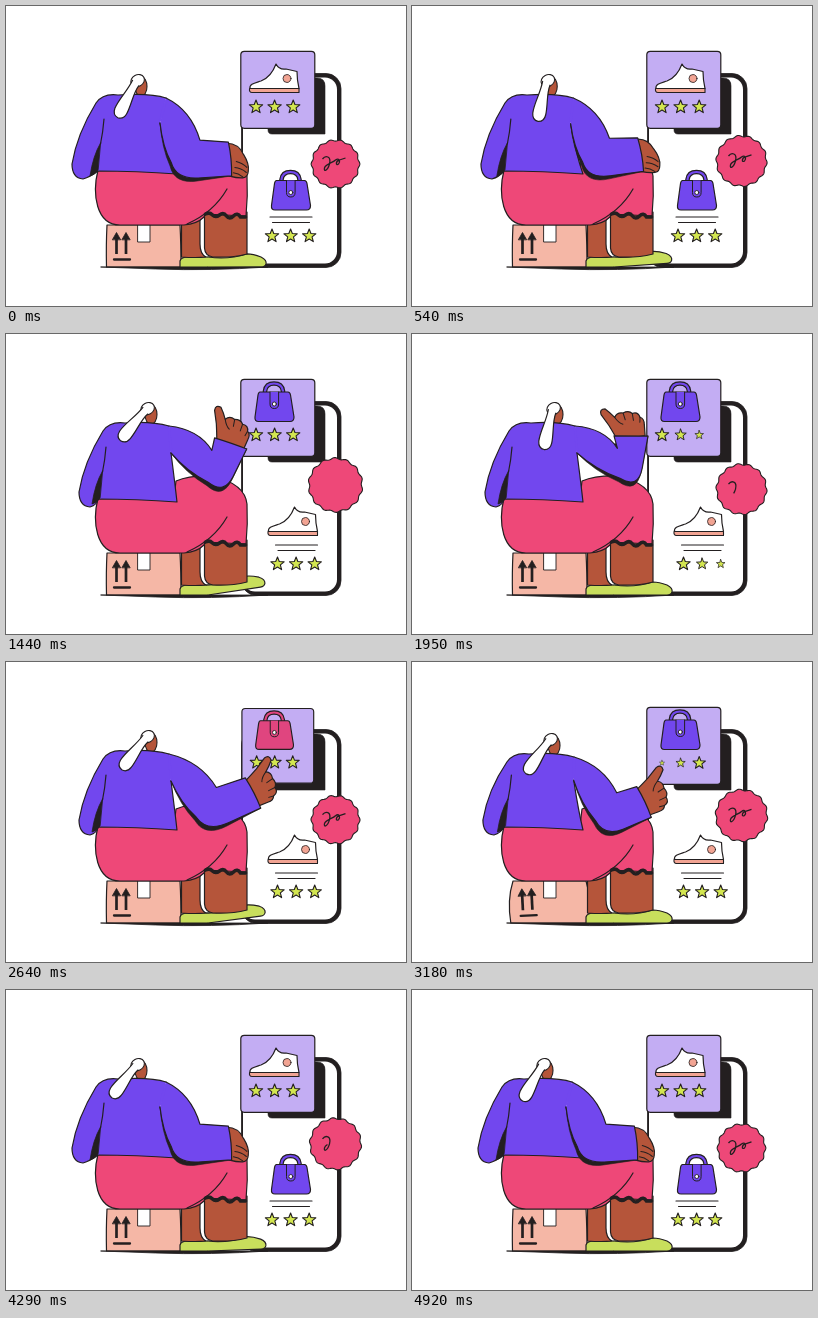
An HTML page for the animation above (4.95 s loop, 400 px wide and 300 px high).

```html
<!DOCTYPE html>
<html lang="en">
<head>
<meta charset="utf-8">
<title>Shopping</title>
<style>
html, body { margin: 0; width: 100%; height: 100%; overflow: hidden; background: #fff; }
svg { display: block; width: 100vw; height: 100vh; }
</style>
</head>
<body>
<svg id="stage" viewBox="0 0 400 300" stroke-linecap="round" stroke-linejoin="round"></svg>
<script>
const LOOP = 4950, TAU = 2 * Math.PI;
const INK = '#231f20', PURPLE = '#7247ee', LAVENDER = '#c3adf3', PINK = '#ee4878', MAGENTA = '#e0457f',
  SKIN = '#b5553a', LIME = '#c8de5c', STAR = '#d3e650', CARTON = '#f5b7a6', SOLE = '#f2a493';
const stage = document.getElementById('stage');

// Motion helpers
const lerp = (a, b, u) => a + (b - a) * u;
const smooth = (t, from, to) => {
  const u = Math.min(1, Math.max(0, (t - from) / (to - from)));
  return u * u * (3 - 2 * u);
};
const pulse = (t, from, length) => {
  const u = (t - from) / length;
  return u > 0 && u < 1 ? Math.sin(Math.PI * u) : 0;
};
const wave = (t, cycles) => Math.sin(TAU * cycles * t / LOOP);

// Vector helpers
const vec = (x, y) => ({ x, y, toString: () => `${x.toFixed(2)} ${y.toFixed(2)}` });
const add = (p, x, y) => vec(p.x + x, p.y + y);
const between = (p, q, u) => vec(lerp(p.x, q.x, u), lerp(p.y, q.y, u));
const toward = (p, q) => {
  const d = Math.hypot(q.x - p.x, q.y - p.y) || 1;
  return vec((q.x - p.x) / d, (q.y - p.y) / d);
};

// Drawing helpers
const path = (d, fill = 'none', stroke = INK, width = 1.2, more = '') =>
  `<path d="${d}" fill="${fill}" stroke="${stroke}" stroke-width="${width}" ${more}/>`;
const rect = (x, y, w, h, r, fill, stroke = INK, width = 1.2) =>
  `<rect x="${x}" y="${y}" width="${w}" height="${h}" rx="${r}" fill="${fill}" stroke="${stroke}" stroke-width="${width}"/>`;
const ellipse = (x, y, rx, ry, fill, width = 1.1) =>
  `<ellipse cx="${x}" cy="${y}" rx="${rx}" ry="${ry}" fill="${fill}" stroke="${INK}" stroke-width="${width}"/>`;
const group = (transform, body) => `<g transform="${transform}">${body}</g>`;
const shift = (x, y, body) => group(`translate(${x} ${y})`, body);
const zoom = (x, y, s, body) => group(`translate(${x} ${y}) scale(${s}) translate(${-x} ${-y})`, body);

function polar(count, radius, start = 0) {
  const points = Array.from({ length: count }, (_, i) => {
    const a = start + TAU * i / count, r = radius(i, a);
    return vec(r * Math.cos(a), r * Math.sin(a));
  });
  return `M${points.join('L')}Z`;
}

const starShape = path(polar(10, i => i % 2 ? 3 : 7, -TAU / 4), STAR, INK, 1.1);
const stars = (x, y, size) => [0, 1, 2].map(i => size(i) < 0.02 ? '' :
  group(`translate(${x + 18.6 * i} ${y}) scale(${size(i)})`, starShape)).join('');

const shoe =
  path('M244 82.5C243 78 249 77 255 75C263 72 267 66 270 58Q273 64 280 63L291 65.5Q291 74 293 82.5Z', '#fff') +
  path('M243.5 82.5H293V86.5H246Q243 86.5 243.5 82.5Z', SOLE, INK, 1.1) +
  ellipse(281, 72.5, 4, 4, SOLE, 0.8);

function bag(color) {
  const handle = 'M259 60V57Q260 49.5 268 49.5Q276 49.5 277 57V60';
  return path(handle, 'none', INK, 4.6) + path(handle, 'none', color, 2.2) +
    path('M254 58H282Q284 58 284.5 61L288 83Q288 87.5 284 87.5H252.5Q248.5 87.5 249 83L252 61Q252.5 58 254 58Z', color) +
    path('M264 58V70Q264 74.5 268.3 74.5Q272.6 74.5 272.6 70V58', color, INK, 1) +
    ellipse(268.3, 70, 2, 2, '#fff', 0.9);
}

function drawBox(squash) {
  const b = 5 * squash;
  const arrow = x => path(`M${x} 248V232`, 'none', INK, 2.7, 'stroke-linecap="butt"') +
    path(`M${x - 4} 233.5L${x} 226.5L${x + 4} 233.5Z`, INK, INK, 0.8);
  return path(`M101 219Q${100 - b} 238 ${100.5 - b / 3} 261H${175 + b / 4}Q${175 + b} 238 174 219Z`, CARTON) +
    path('M132 219H144V236H132Z', '#fff', INK, 0.9) +
    group(`rotate(${-3 * squash} 116 240)`,
      arrow(110.5) + arrow(120) + path('M108 253.5H124', 'none', INK, 2.3));
}

const starDip = (t, i) => 1 - 0.5 * pulse(t, 1530 + 60 * i, 400);

function drawPhone(t) {
  const firstHalf = t < LOOP / 2;
  const away = firstHalf ? smooth(t, 920, 1310) : 1 - smooth(t, 3250, 3805);
  const line = (x, y, w, from) => {
    const grow = firstHalf ? 1 : smooth(t, from, from + 250);
    return grow ? path(`M${x} ${y}h${w * grow}`, 'none', INK, 1.1) : '';
  };
  const row = x => stars(x, 230, i => starDip(t, i));
  return rect(235.5, 67.5, 99.5, 194, 15, INK, INK, 0.8) +
    rect(237, 71.5, 94, 186, 12, '#fff', 'none', 0) +
    '<g clip-path="url(#screen)">' +
    shift(-73 * away, 0, shift(16.5, 116.5, bag(PURPLE)) +
      line(264, 211, 42, 3650) + line(266.5, 216.5, 37, 3770) + row(266)) +
    shift(73 * (1 - away), 0, shift(18.5, 115, shoe) +
      line(269.5, 211, 42, 0) + line(272, 216.5, 37, 0) + row(271.5)) + '</g>' +
    path('M262 72H311Q319 72 319 80V128H266Q262 128 262 124Z', INK, INK, 0.6);
}

const HOP = 3257, PEAK = 3617;
function hoppingBag(t) {
  const rise = 46 * (1 - ((t - PEAK) / (PEAK - HOP)) ** 2);
  return group(`translate(-1 ${-rise}) rotate(${-4 * smooth(t, HOP, PEAK)} 268 68)`, bag(PURPLE));
}

function drawCard(t) {
  const slide = smooth(t, 853, 1133);
  const tint = t > 2580 && t < 2860 ? MAGENTA : PURPLE;
  const starSize = i => t > 3470 ? smooth(t, 3470 + 50 * i, 3630 + 50 * i)
    : (1 - smooth(t, 3043 + 50 * i, 3283 + 50 * i)) * starDip(t, i);
  const pop = smooth(t, 3420, 3680);
  const body = t < HOP
    ? shift(-70 * slide, 0, shoe + stars(250, 101, () => 1)) +
      shift(70 * (1 - slide), 0, bag(tint) + stars(250, 101, starSize))
    : zoom(269, 75, pop, shoe) + stars(250, 101, starSize);
  const size = 1 - 0.03 * pulse(t, 2540, 200) + 0.04 * pulse(t, 2740, 260);
  const card = zoom(272, 84, size, rect(234.8, 45.3, 74, 77, 3.5, LAVENDER) +
    `<g clip-path="url(#card)">${body}</g>`);
  // The bag leaves in front of the card and drops behind it.
  if (t < HOP || t > 2 * PEAK - HOP) return card;
  return t < PEAK ? card + hoppingBag(t) : hoppingBag(t) + card;
}

function drawBadge(t) {
  const swell = 0.5 - 0.5 * Math.cos(2 * TAU * t / LOOP);
  const R = 23.6 + 3.2 * swell;
  const start = t < 1500 ? smooth(t, 700, 1250) : t < 3900 ? smooth(t, 3300, 3680) : 0;
  const end = t < 1500 ? 1 : t < 3900 ? smooth(t, 1750, 2300) : smooth(t, 4000, 4600);
  const squiggle = 'M-13-5C-10-9-4-8-6 0C-8 7-12 8-11 4C-10 0-3-1 0-4C4-7 5-2 3 0C0 2 0-3 4-4L10-6';
  const ink = end - start > 0.01 ? path(squiggle, 'none', INK, 1.3,
    `pathLength="1" stroke-linecap="butt" stroke-dasharray="0 ${start} ${end - start} 2"`) : '';
  return shift(329.5, 158 - 7.5 * swell, group(`rotate(${12 * swell})`,
    path(polar(168, (i, a) => R * (1 + 0.032 * Math.cos(14 * a))), PINK, INK, 1.1)) + ink);
}

function drawLegs(t) {
  const tap = Math.max(0, wave(t, 4));
  return path('M174 261V255Q175 251 182 251H204V261Z', LIME) +
    group(`rotate(${-10 * tap} 202 261)`,
      path('M202 251Q222 254 241 248Q247 248 255 251Q261 254 260 258Q259 261 255 261H202', LIME)) +
    path('M175.5 216V251Q190 252 200 251Q194 248 194 238V212Z', SKIN) +
    path('M198.5 206V242Q199 250 207 251Q225 252 241 248V206Z', SKIN);
}

const skirt =
  path('M92 164C86 188 90 219 114 219H178Q191 218 198 211L199 208L240 210Q242 190 241 170Q239 150 207 142Q184 141 170 147L168 164Z', PINK) +
  path('M221 183Q208 206 181 218') +
  path('M199.5 208q4-2 7 1t7 0t7 1t7 0t7 1l5 0', 'none', INK, 3.6);

// Elbow and wrist of each pose, with the time it is reached and left.
const pose = (reach, leave, ex, ey, wx, wy) => ({ reach, leave, elbow: vec(ex, ey), wrist: vec(wx, wy) });
const POSES = [
  pose(0, 420, 183, 152, 224, 153),
  pose(840, 840, 206, 146, 247, 131),
  pose(1020, 1160, 203, 145, 238, 127),
  pose(1600, 2250, 215, 133, 219, 102),
  pose(2600, 2780, 206, 146, 247, 131),
  pose(3180, 3180, 199, 151, 232, 140),
  pose(3560, LOOP, 183, 152, 224, 153)
];

function armAt(t, lean, drop) {
  const next = Math.max(1, POSES.findIndex(p => t < p.reach));
  const from = POSES[t < POSES.at(-1).reach ? next - 1 : POSES.length - 1];
  const to = t < POSES.at(-1).reach ? POSES[next] : from;
  const u = from === to ? 0 : smooth(t, from.leave, to.reach);
  const elbow = between(from.elbow, to.elbow, u), wrist = between(from.wrist, to.wrist, u);
  const shoulder = vec(160 + 3 * lean, 92 + drop), armpit = vec(154 + 11 * lean, 117 + 2 * lean);

  // The inner crook and outer elbow lie on the bisector of the bend.
  const a = toward(elbow, between(shoulder, armpit, 0.5)), b = toward(elbow, wrist);
  const bend = toward(vec(0, 0), vec(a.x + b.x, a.y + b.y));
  const angle = Math.atan2(b.y, b.x) - 0.12;
  const side = vec(17 * Math.sin(angle), -17 * Math.cos(angle));
  return {
    shoulder, armpit, wrist, angle: angle * 180 / Math.PI,
    crook: add(elbow, 21 * bend.x, 21 * bend.y), point: add(elbow, -25 * bend.x, -25 * bend.y),
    cuffTop: add(wrist, side.x, side.y), cuffEnd: add(wrist, -side.x, -side.y)
  };
}

function drawHand(arm, t) {
  const resting = t < 560 || t > 3400;
  const hand = resting
    ? path('M-2-16Q10-15 14-3Q19 7 17 14Q16 20 11 20Q6 20-2 17Z', SKIN) +
      path('M6 3Q12 5 16 10M4 9Q10 10 15 15M2 14Q7 15 11 19', 'none', INK, 1)
    : path('M-2-14C4-16 9-18 14-20L26-26Q32-27 31-21Q27-17 21-13Q26-10 24-4Q26 2 22 5Q23 11 17 12Q15 16 9 15L-2 14Z', SKIN) +
      path('M21-13Q15-10 13-6M24-4L17-3M22 5L15 5M17 12L12 11', 'none', INK, 1);
  const flick = -10 * pulse(t, 1700, 500);
  return group(`translate(${arm.wrist}) rotate(${arm.angle + flick})`, hand);
}

function drawArm(arm, t) {
  const { shoulder, armpit, crook, point, cuffTop, cuffEnd } = arm;
  const outer = add(between(shoulder, crook, 0.5), 8, -9);
  const underside = dy => {
    const p = add(point, -dy / 3, dy), end = between(p, armpit, 0.3);
    return `${cuffEnd}L${between(p, cuffEnd, 0.4)}Q${p} ${end}Q${add(between(end, armpit, 0.5), -3, 4)} ${armpit}`;
  };
  return path(`M${underside(5)}Z`, INK, INK, 0.6) + drawHand(arm, t) +
    path(`M${shoulder}Q${outer} ${crook}L${cuffTop}Q${add(arm.wrist, 2, 0)} ${underside(0)}`, PURPLE) +
    path(`M${add(shoulder, 0, 3)}L${add(armpit, 0, -3)}`, 'none', PURPLE, 2.4);
}

function drawTorso(arm, lean, drop) {
  const x = v => v + 7 * lean, y = v => v + drop;
  return path(`M${arm.shoulder}Q145 ${y(87)} ${x(112)} ${y(89)}Q${x(97)} ${y(87)} ${x(90)} ${y(97)}` +
    `Q${x(71)} 128 ${x(66)} 158Q${x(66)} 172 ${x(77)} 173Q${x(84)} 171 92 165` +
    `Q130 165 171 168Q${lerp(161, 169, lean)} 150 ${arm.armpit}`, PURPLE) +
    shift(2 * lean, 0, path('M98 113Q97 126 94.5 138') +
      path('M94.5 137Q87 150 84 170Q89 169 92 164Z', INK, INK, 0.8));
}

const drawHair = (x, y, t) =>
  group(`rotate(-28 ${x} ${y})`, ellipse(x + 1, y - 0.5, 7, 5.8, '#fff')) +
  group(`translate(${x} ${y}) rotate(${28 - 17 * wave(t, 3)})`,
    path('M-4.5 1C-4 13-8 24-7 34Q-6 41 0 41Q6 40 6 33C6 23 2 12 3.5 3', '#fff'));

function drawPerson(t, drop) {
  const lean = smooth(t, 330, 800) - smooth(t, 3000, 3500);
  const arm = armAt(t, lean, drop), x = 131 + 10 * lean, y = 75.5 + drop;
  return drawLegs(t) + skirt + ellipse(x + 4, y + 5, 6, 10, SKIN) +
    drawTorso(arm, lean, drop) + drawArm(arm, t) + drawHair(x, y, t);
}

const defs = '<defs><clipPath id="screen"><rect x="237" y="71.5" width="94" height="186" rx="12"/></clipPath>' +
  '<clipPath id="card"><rect x="235.4" y="45.9" width="72.8" height="75.8" rx="3"/></clipPath></defs>';

function draw(t) {
  const squash = pulse(t, 2980, 400);
  stage.innerHTML = defs + drawBox(squash) + drawPhone(t) + drawCard(t) + drawBadge(t) +
    path('M95 261H262Q205 265 150 263Z', INK, INK, 0.8) + drawPerson(t, 3 * squash);
}

const begin = performance.now();
function tick() {
  draw((performance.now() - begin) % LOOP);
  requestAnimationFrame(tick);
}
tick();
</script>
</body>
</html>
```
